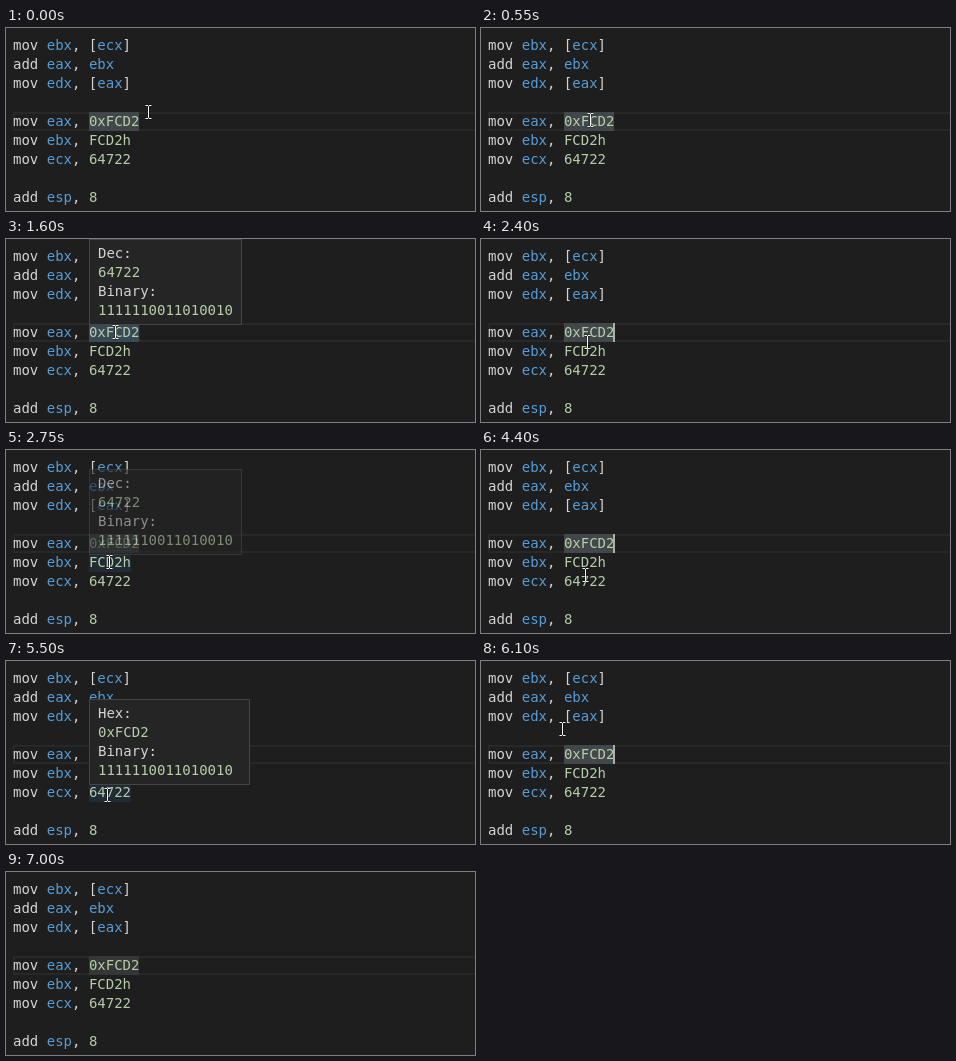
Write an HTML page that moves like this. It is 469 by 183 pixels and loops after 7150 ms.

```html
<!DOCTYPE html>
<html lang="en">
<head>
<meta charset="utf-8">
<title>Number hover</title>
<style>
  html, body { margin: 0; width: 100%; height: 100%; overflow: hidden; background: #1e1e1e; }
  #stage {
    position: relative; width: 469px; height: 183px; overflow: hidden;
    background: #1e1e1e; color: #d4d4d4;
    font: 14px/19px "DejaVu Sans Mono", monospace;
  }
  #stage > * { position: absolute; box-sizing: border-box; }
  pre { margin: 0; font: inherit; }
  #code { left: 7px; top: 8px; }
  .reg { color: #569cd6; }
  .num { color: #b5cea8; }
  #line { left: 7px; right: -4px; top: 84px; height: 19px; border: 2px solid #282828; }
  #word { left: 83px; top: 84px; width: 50px; height: 19px; }
  #mark { left: 83px; height: 19px; background: #264f7840; }
  #caret { left: 132px; top: 84px; width: 2px; height: 19px; background: #aeafad; }
  #popup { left: 83px; padding: 4px 8px; background: #252526; border: 1px solid #454545; }
  #beam { left: -5px; top: -10px; width: 10px; height: 20px; }
</style>
</head>
<body>
<div id="stage">
  <div id="line"></div>
  <div id="word"></div>
  <div id="mark"></div>
  <pre id="code"></pre>
  <div id="caret"></div>
  <pre id="popup"></pre>
  <svg id="beam" viewBox="-5 -10 10 20" fill="none">
    <defs><path id="ink" d="M-3 -6.5H-.5M.5 -6.5H3M0 -6V6M-3 6.5H-.5M.5 6.5H3"/></defs>
    <use href="#ink" stroke="#000" stroke-width="2.4" stroke-opacity=".45"/>
    <use href="#ink" stroke="#fff"/>
  </svg>
</div>
<script>
const LOOP = 7150, TICK = 50, ROW = 19, BLUR = 7000;
const $ = id => document.getElementById(id);
const [word, mark, caret, popup, beam] = ["word", "mark", "caret", "popup", "beam"].map($);

const source = `mov ebx, [ecx]
add eax, ebx
mov edx, [eax]

mov eax, 0xFCD2
mov ebx, FCD2h
mov ecx, 64722

add esp, 8`;

const num = s => `<span class="num">${s}</span>`;
const reg = s => `<span class="reg">${s}</span>`;
$("code").innerHTML = source.replace(/\be[a-d]x\b|\besp\b|\b(?:0x)?[\dA-F]+h?\b/g,
  s => s[0] === "e" ? reg(s) : num(s));

const value = 0xFCD2, bits = value.toString(2);
const tip = (label, text, binary) => `${label}:\n${num(text)}\nBinary:\n${num(binary)}`;
const decTip = tip("Dec", value, bits);
const hexTip = tip("Hex", "0x" + value.toString(16).toUpperCase(), bits + " ");

// One hover per number, each a row further down
const hovers = [
  { from: 1500, to: 2200, chars: 6, html: decTip },
  { from: 2700, to: 4050, chars: 5, html: decTip },
  { from: 4700, to: 6100, chars: 5, html: hexTip }
];

// Pointer glides: start and end time, then where it comes to rest
const home = { x: 142, y: 84 };
const glides = [
  { from: 0, to: 550, x: 109, y: 92 },
  { from: 1000, to: 1050, x: 109, y: 93 },
  { from: 2050, to: 2750, x: 103, y: 112 },
  { from: 3450, to: 3500, x: 119, y: 113 },
  { from: 3900, to: 4400, x: 104, y: 125 },
  { from: 4400, to: 4800, x: 112, y: 134 },
  { from: 5450, to: 5500, x: 101, y: 134 },
  { from: 5750, to: 6500, x: 57, y: -12 }
];

const clamp = v => Math.min(1, Math.max(0, v));
const ease = p => p * p * (3 - 2 * p);

function pointerAt(t) {
  let { x, y } = home;
  for (const g of glides) {
    const k = ease(clamp((t - g.from) / (g.to - g.from)));
    x += (g.x - x) * k;
    y += (g.y - y) * k;
  }
  return [Math.round(x) + 0.5, Math.round(y)];
}

const caretOn = t => t < BLUR && Math.floor((t - 42) / 504) % 2 === 0;

let shown = -1;

function showHover(t) {
  const i = hovers.findIndex(h => t >= h.from && t < h.to);
  popup.style.display = mark.style.display = i < 0 ? "none" : "block";
  if (i < 0) return;
  const { from, chars, html } = hovers[i];
  if (i !== shown) {
    shown = i;
    popup.innerHTML = html;
    popup.style.top = i * ROW + "px";
    mark.style.top = 84 + i * ROW + "px";
    mark.style.width = chars + "ch";
  }
  popup.style.opacity = clamp((t - from + 12) / 100);
}

function draw(ms) {
  const t = Math.floor((ms % LOOP) / TICK) * TICK;
  const [x, y] = pointerAt(t);
  beam.style.transform = `translate(${x}px, ${y}px)`;
  caret.style.display = caretOn(t) ? "block" : "none";
  word.style.background = t < BLUR ? "#41474a" : "#343736";
  showHover(t);
}

const start = performance.now();
(function frame() {
  draw(performance.now() - start);
  requestAnimationFrame(frame);
})();
</script>
</body>
</html>
```
